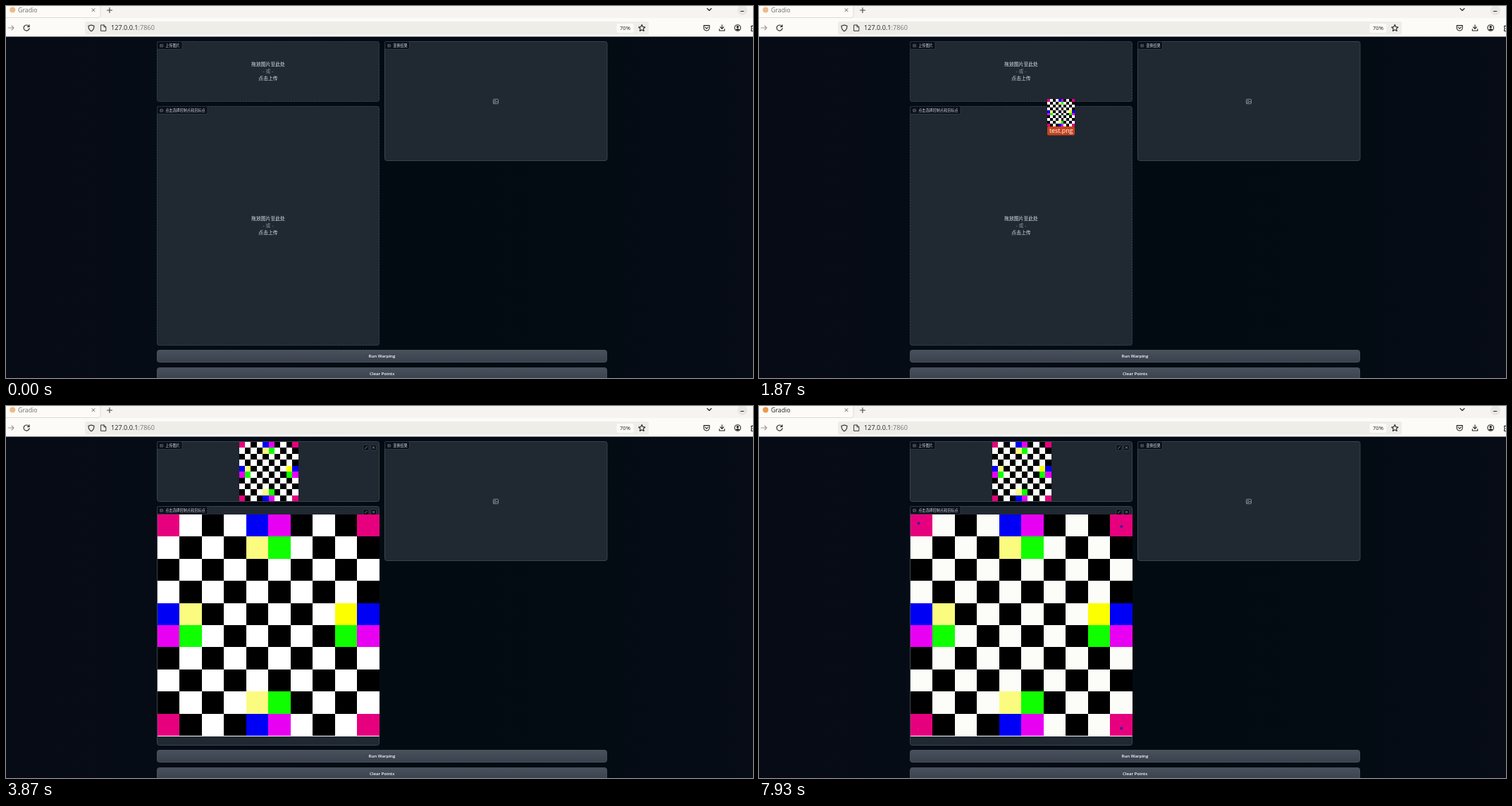
An HTML page for the animation above (8000 ms loop, 1060 by 528 pixels).

```html
<!DOCTYPE html>
<html lang="zh">
<head>
<meta charset="utf-8">
<title>Warping demo</title>
<style>
  html, body { margin: 0; width: 100%; height: 100%; overflow: hidden; background: #040b14; }
  svg { display: block; width: 1060px; height: 528px; }
  text { font-family: "Open Sans", "Noto Sans CJK SC", "Noto Sans CJK", sans-serif; }
  .mid { text-anchor: middle; }
  .line { fill: none; stroke: #222; stroke-width: 1.1; stroke-linecap: round; stroke-linejoin: round; }
  .thin { fill: none; stroke: #aeb5be; stroke-width: .7; }
</style>
</head>
<body>
<svg id="stage" viewBox="0 0 1060 528" xmlns="http://www.w3.org/2000/svg"></svg>
<script>
const LOOP = 8000, STEP = 1000 / 15;
const stage = document.getElementById('stage');

const rect = (x, y, w, h, fill, more = '') =>
  `<rect x="${x}" y="${y}" width="${w}" height="${h}" fill="${fill}" ${more}/>`;
const text = (x, y, size, fill, s, more = '') =>
  `<text x="${x}" y="${y}" font-size="${size}" fill="${fill}" ${more}>${s}</text>`;
const path = (d, more = '') => `<path class="line" d="${d}" ${more}/>`;
const group = (id, body) => `<g id="${id}">${body}</g>`;

// Checkerboard with coloured cells on its corners and edge centres
function cellColor(r, c) {
  const edge = v => v === 0 || v === 9;
  const inner = v => v === 1 || v === 8;
  if (edge(r) && edge(c)) return '#e6007e';
  for (const [a, b] of [[r, c], [c, r]]) {
    if (edge(a) && b === 4) return '#0000f5';
    if (edge(a) && b === 5) return '#e800f2';
    if (inner(a) && b === 4) return r === 4 && c === 8 ? '#fcff00' : '#fbfb80';
    if (inner(a) && b === 5) return '#10ff00';
  }
  return (r + c) % 2 ? 'var(--white, #fff)' : '#000';
}
function checker(x, y, w, h) {
  let s = '';
  for (let i = 0; i < 100; i++) {
    const r = Math.floor(i / 10), c = i % 10;
    s += rect(x + c * w / 10, y + r * h / 10, w / 10, h / 10, cellColor(r, c));
  }
  return `<g shape-rendering="crispEdges">${s}</g>`;
}

const picture = (x, y, s) => `<g class="thin" transform="translate(${x} ${y}) scale(${s})">
  <rect x="-3.5" y="-3.2" width="7" height="6.4" rx="1"/><circle cx="-1.2" cy="-1" r=".7"/>
  <path d="M-3.2 2.4L-1 .8L0 1.6L1.6 -.4L3.4 1.6"/></g>`;
const panel = (x, y, w, h, label, labelWidth) =>
  rect(x + .5, y + .5, w - 1, h - 1, '#202832', 'rx="3" stroke="#3a444f"') +
  rect(x + .5, y + .5, labelWidth, 11, '#0a101a', 'rx="1.5" stroke="#343e4b" stroke-width=".8"') +
  picture(x + 6.7, y + 6.3, .58) + text(x + 12.2, y + 8.2, 5.15, '#d5dae0', label);
const dashes = (x, y, w, h) =>
  rect(x + .5, y + .5, w - 1, h - 1, 'none', 'rx="3" stroke="#222b35" stroke-dasharray="2 2"');
const prompt = y => [['拖放图片至此处', '#dce1e6'], ['- 或 -', '#89929d'], ['点击上传', '#dce1e6']]
  .map(([s, fill], i) => text(372, y + i * 10, 6.85, fill, s, 'class="mid"')).join('');
const tools = y => [511, 521.5].map((x, i) =>
  rect(x - 4, y - 4, 8, 8, '#0a101a', 'rx="1.5" stroke="#3a444f" stroke-width=".8"') +
  `<path class="thin" d="${i ? `M${x - 1.6} ${y - 1.6}l3.2 3.2m0 -3.2l-3.2 3.2` : `M${x - 1.8} ${y + 1.8}l3.6 -3.6`}"/>`).join('');
const button = (y, label) =>
  rect(214.5, y + .5, 638, 17, 'url(#btn)', 'rx="3" stroke="#4a535e"') +
  text(533.5, y + 11.4, 6.1, '#fff', label, 'class="mid" font-weight="600"');

const browser =
  rect(0, 0, 1060, 18, '#f5f4f0') + rect(0, 17, 1060, 26.5, '#fcfbf7') +
  rect(-4, -4, 138, 20.5, '#fcfbf7', 'rx="3" stroke="#d8d7d2" stroke-width=".8"') +
  group('tab', '<circle cx="9.3" cy="5.5" r="4" fill="#e89a4c"/>' + text(17, 9, 8.8, '#222', 'Gradio')) +
  path('M122 3.7l4 4m0 -4l-4 4', 'stroke-width=".8" style="stroke:#555;stroke-width:.9"') +
  path('M143.5 6h7m-3.5 -3.5v7', 'style="stroke:#444"') +
  path('M995 3.5l3 3l3 -3') +
  '<circle cx="1045" cy="6" r="7" fill="#e8e6e2"/>' + path('M1042.7 7.5h4') +
  path('M3 31h8m-3 -3l3 3l-3 3', 'style="stroke:#999"') +
  path('M32.3 28.6a4 4 0 1 0 .8 3M33 26.8v2.7h-2.7') +
  rect(112, 22, 800, 18.5, '#eeede8', 'rx="2.5"') +
  path('M121 27l4 1.3c0 4 -1 6 -4 7.5c-3 -1.5 -4 -3.5 -4 -7.5z') +
  path('M135 27h4l2.8 2.8v5.5h-6.8zM139 27v2.8h2.8', 'style="stroke-width:.9"') +
  text(149, 34.4, 9.15, '#202020', '127.0.0.1<tspan fill="#777">:7860</tspan>') +
  rect(866.5, 25, 24, 13, '#fbfaf6', 'rx="2"') + text(878.5, 34, 7.6, '#202020', '70%', 'class="mid"') +
  path('M902.3 26.6l1.4 3l3.2 .4l-2.4 2.2l.7 3.2l-2.9 -1.6l-2.9 1.6l.7 -3.2l-2.4 -2.2l3.2 -.4z') +
  path('M990.2 27.6h8v3.4a4 4 0 0 1 -8 0zM992.2 30.2l2 2l2 -2') +
  path('M1016 26.8v5.4m-2.5 -2.4l2.5 2.5l2.5 -2.5M1012.3 32.8v2.2h7.4v-2.2') +
  '<circle class="line" cx="1038.2" cy="31" r="4.3"/><circle cx="1038.2" cy="29.8" r="1.7" fill="#222"/>' +
  '<path d="M1035.2 33.6q3 -3 6 0q-3 2.4 -6 0z" fill="#222"/>' +
  path('M1061 28.4h-3.4v2.4q2 .8 0 2.4v2.3h4');

stage.innerHTML = `<defs>
  <linearGradient id="page"><stop offset="0" stop-color="#070b15"/><stop offset=".2" stop-color="#060c16"/>
    <stop offset=".5" stop-color="#030b12"/><stop offset=".8" stop-color="#030b13"/><stop offset="1" stop-color="#070c17"/></linearGradient>
  <linearGradient id="btn" x2="0" y2="1"><stop stop-color="#48515c"/><stop offset="1" stop-color="#38414d"/></linearGradient>
  </defs>` +
  rect(0, 43, 1060, 485, 'url(#page)') + browser +
  panel(214, 50, 316, 86, '上传图片', 35.5) +
  panel(214, 142, 316, 340, '点击选择控制点和目标点', 71.5) +
  panel(537, 50, 316.5, 170, '变换结果', 35) + picture(695, 135.5, 1) +
  group('prompt1', dashes(214, 50, 316, 86) + prompt(85)) +
  group('prompt2', dashes(214, 142, 316, 340) + prompt(304)) +
  group('tools1', tools(59)) +
  group('images', tools(150.5) + checker(330.5, 51, 84.2, 84.2) +
    rect(215, 467, 314.6, 2, '#fff') + checker(215, 154, 314.8, 314)) +
  group('marks', '') +
  button(488, 'Run Warping') + button(513, 'Clear Points') +
  group('file', checker(0, 0, 39, 39) + rect(0, 39, 39, 12.5, '#c4441d', 'rx="2"') +
    text(19.7, 48.3, 8.9, '#fff', 'test.png', 'class="mid"'));

const el = id => document.getElementById(id);
const show = (id, on) => { el(id).style.display = on ? '' : 'none'; };

// Dragged file: [step, x, y]
const drag = [[19, 920, 500], [23, 652, 351], [28, 409, 132], [31, 350, 72]];
function dragAt(step) {
  const i = Math.max(1, drag.findIndex(k => k[0] >= step));
  const a = drag[i - 1], b = drag[step > 31 ? 3 : i];
  const u = Math.min(1, (step - a[0]) / (b[0] - a[0] || 1));
  return [1, 2].map(j => Math.round(a[j] + (b[j] - a[j]) * u));
}

// Clicked points: [time of control point, time of its end point, x, y]
const clicks = [[4600, 4870, 226.7, 166.5], [5800, 6270, 514.4, 171], [6870, 7070, 514.3, 457.5], [7930, LOOP, 225.5, 458]];
const mark = (x, y, r, fill) => `<circle cx="${x}" cy="${y}" r="${r}" fill="${fill}"/>`;

function draw(t) {
  const step = Math.min(31, Math.floor((t + 4) / STEP));
  const dragging = step >= 19 && t < 2270;
  show('file', dragging);
  if (dragging) el('file').setAttribute('transform', `translate(${dragAt(step)})`);
  show('prompt1', t < 2330);
  show('tools1', t >= 2330);
  show('prompt2', t < 2470);
  show('images', t >= 2470);
  el('images').style.setProperty('--white', t < 5730 ? '#fff' : '#fcfcf8');
  el('tab').setAttribute('opacity', t < 4330 ? .65 : 1);
  el('marks').innerHTML = clicks.map(([start, end, x, y]) =>
    t < start ? '' : t < end ? mark(x, y, 1, '#f02a10')
      : mark(x, y, 2, '#2a249c') + mark(x, y + .4, .6, '#8a1a78')).join('');
}

function frame(now) {
  draw(now % LOOP);
  requestAnimationFrame(frame);
}
draw(0);
requestAnimationFrame(frame);
</script>
</body>
</html>
```
